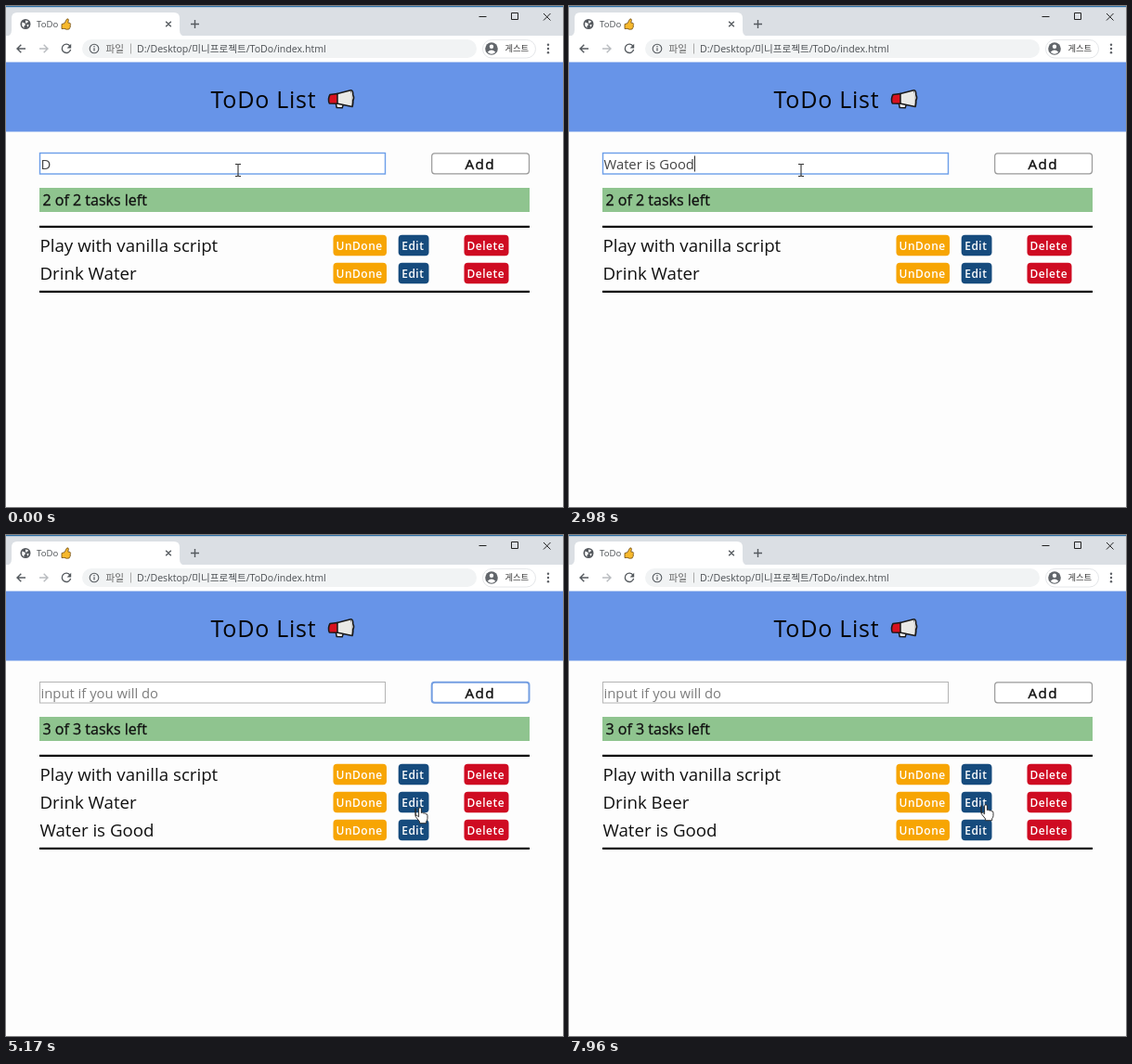
Write an HTML page that moves like this. It is 600 px wide and 540 px high and loops after 8000 ms.

```html
<!DOCTYPE html>
<html lang="ko">
<head>
<meta charset="utf-8">
<title>ToDo</title>
<style>
  html, body { margin: 0; width: 100%; height: 100%; overflow: hidden; background: #fdfdfd; }
  svg { display: block; width: 600px; height: 540px; }
  text { font-family: "Open Sans", "Noto Sans CJK KR", "Noto Sans CJK", sans-serif; white-space: pre; fill: #111; }
  .ui { font-size: 10.6px; fill: #4c5054; }
  .item { font-size: 18.7px; }
  .field { font-size: 14.8px; fill: #444; }
  .btn { font-size: 12px; font-weight: 600; letter-spacing: .5px; fill: #fff; }
  .line { fill: none; stroke: #555a5f; stroke-width: 1.4; }
</style>
</head>
<body>
<svg viewBox="0 0 600 540">
  <rect width="600" height="540" fill="#fdfdfd"/>

  <!-- window and tab strip -->
  <rect width="600" height="33" fill="#dbdfe4"/>
  <rect width="600" height="1.2" fill="#2f70a5"/>
  <path d="M0 33Q6 32 6 26V13Q6 7 12 7H181Q187 7 187 13V26Q187 32 193 33Z" fill="#fff"/>
  <circle cx="21" cy="19.5" r="5.5" fill="#55595e"/>
  <path d="M17.3 17.5l3 1 .6 2-1.5 1.2v2l-2.2-2.4zM21 15.5l3 .8-1 1.9-2 .2zM22.4 20l2.4.3-1.6 2.8z" fill="#fff"/>
  <text class="ui" x="33" y="23" style="font-size:9.6px">ToDo</text>
  <g stroke="#6d4a12" stroke-width=".8" stroke-linejoin="round">
    <path d="M60 19.5l3-.8 2.4-4.5q1.8-1.1 2 .9l-.6 3 2.2.3q1.2.8.2 1.9l.2 1.7-.6 1.5-.7 1.4q-2.8 1-5.3-.5l-2.8.2z" fill="#f7b92d"/>
  </g>
  <path class="line" d="M172.2 16.7l5.6 5.6m0-5.6l-5.6 5.6M199 19.5h9m-4.5-4.5v9"/>
  <path d="M509.5 11.5h8M544.5 7.5h7v7h-7zM579 8l7.5 7.5m0-7.5L579 15.5" fill="none" stroke="#222"/>

  <!-- toolbar -->
  <rect y="32" width="600" height="28.5" fill="#fff"/>
  <path class="line" d="M21 46H12m4.3-4.3L12 46l4.3 4.3"/>
  <path class="line" d="M36 46h9m-4.3-4.3L45 46l-4.3 4.3" style="stroke:#b9bcc0"/>
  <path class="line" d="M69 43.3a4.7 4.7 0 1 0 .6 3.6"/>
  <path d="M70.2 40.8v4.6h-4.6z" fill="#555a5f"/>
  <rect x="82" y="36" width="425" height="20" rx="10" fill="#f1f3f4"/>
  <circle class="line" cx="95" cy="46" r="4.8" style="stroke-width:1.1"/>
  <path class="line" d="M95 45.3v3.3M95 43v1.2" style="stroke-width:1.2"/>
  <text class="ui" x="107.5" y="49.7" style="fill:#666">파일</text>
  <path d="M134.5 40.5v11" stroke="#aaa"/>
  <text class="ui" x="141" y="49.7">D:/Desktop/미니프로젝트/ToDo/index.html</text>
  <rect x="513.5" y="36.5" width="57" height="19.5" rx="9.7" fill="#fff" stroke="#e4e6e9"/>
  <circle cx="523" cy="46" r="6.8" fill="#62666b"/>
  <circle cx="523" cy="43.7" r="2.2" fill="#fff"/>
  <path d="M518.7 49.7q4.3-4.4 8.6 0-4.3 4-8.6 0z" fill="#fff"/>
  <text class="ui" x="537.5" y="49" style="font-size:9.3px;fill:#333">게스트</text>
  <g fill="#5a5e63"><circle cx="584" cy="41.7" r="1.2"/><circle cx="584" cy="46" r="1.2"/><circle cx="584" cy="50.3" r="1.2"/></g>

  <!-- page header -->
  <rect y="60.5" width="600" height="75" fill="#6794e8"/>
  <text x="220.5" y="110" style="font-size:25px;letter-spacing:.75px;fill:#050505">ToDo List</text>
  <g stroke="#1a1a1a" stroke-width="1.5" stroke-linejoin="round">
    <path d="M355 103l1.2 6.5 6 .3 1-3.2" fill="#eee"/>
    <path d="M355 95L371.5 90.8Q375 98.5 372.8 108.5L355 104.8Z" fill="#e9e9e6"/>
    <path d="M357 94.5L349 95.5Q346.3 100 348.3 105L357 105.2Z" fill="#d8111f"/>
    <path d="M371.5 90.8q2.5 0 2.3 5 1.8 3-.2 6.2.4 6-.8 6.5" fill="#ccc"/>
  </g>

  <!-- entry row and summary -->
  <rect id="box" x="36.5" y="158.5" width="372" height="22.5" fill="#fff"/>
  <text id="entry" class="field" x="37.5" y="175.5"></text>
  <rect id="add" x="458.7" y="158.8" width="104.8" height="22" rx="3" fill="#fff"/>
  <text x="494.5" y="175.8" style="font-size:15.3px;letter-spacing:1.4px;stroke:#111;stroke-width:.4px">Add</text>
  <rect x="36" y="196" width="528" height="26" fill="#8fc48f"/>
  <text id="left" x="39.5" y="215" style="font-size:16px;stroke:#111;stroke-width:.3px"></text>

  <!-- list -->
  <rect x="36" y="236.8" width="528" height="2.2"/>
  <rect id="end" x="36" width="528" height="2.2"/>
  <g id="editor">
    <rect id="editBox" x="36.5" y="277.5" width="291" height="21.5" fill="#fff"/>
    <rect id="mark" x="88.5" y="278" width="52.5" height="20.8" fill="#3b92f4"/>
  </g>
  <g id="rows"></g>
  <rect id="caret" width="1" fill="#222"/>

  <g id="cursor">
    <path id="beam" d="M-3 -6.5h2.2L0 -5.7.8-6.5H3M0 -5.7V5.7M-3 6.5h2.2L0 5.7.8 6.5H3" fill="none" stroke="#333" stroke-width="1.1"/>
    <path id="arrow" d="M0 0V12.3L2.9 9.6 4.9 14.2 6.9 13.3 4.9 8.9H8.8Z" fill="#fff" stroke="#222" stroke-width=".9"/>
    <path id="hand" d="M-1.4 1Q-1.3-.3 0-.3T1.4 1V5.5Q2.7 4.6 3.8 6 5.2 5.2 6.2 6.7 8 6.2 8 8.4V11.5Q8 13.5 6.7 14.7V16.7H-.4V15L-4.7 9.6Q-5-7.7-5 8.5-3.6 7.4-1.4 9.8Z" fill="#fff" stroke="#222" stroke-width=".9" stroke-linejoin="round"/>
  </g>
</svg>
<script>
const LOOP = 8000, ADDED = 3720, EDITED = 5280, PICKED = 6370, SAVED = 7900;
const $ = id => document.getElementById(id);
const show = (el, on) => el.setAttribute("display", on ? "inline" : "none");
const set = (el, props) => { for (const k in props) el.setAttribute(k, props[k]); };

function make(tag, props, parent, text = "") {
  const el = document.createElementNS("http://www.w3.org/2000/svg", tag);
  set(el, props);
  el.textContent = text;
  parent.appendChild(el);
  return el;
}

function button(parent, x, y, width, fill, label, pad = 3.5) {
  const rect = make("rect", { x, y, width, height: 22.5, rx: 4, fill }, parent);
  const text = make("text", { class: "btn", x: x + pad, y: y + 16 }, parent, label);
  return { rect, text };
}

const rows = ["Play with vanilla script", "Drink Water", "Water is Good"].map((name, i) => {
  const g = make("g", {}, $("rows")), y = 246.8 + 30 * i;
  const text = make("text", { class: "item", x: 36.5, y: y + 18 }, g, name);
  button(g, 352.5, y, 57.5, "#f7a503", "UnDone", 3);
  const edit = button(g, 422.7, y, 32.8, "#164b7d", "Edit");
  button(g, 493.5, y, 48, "#cf0b22", "Delete", 3);
  return { g, text, edit };
});

// Key press times for each typed string
const entryKeys = [1060, 1390, 1480, 1580, 1780, 2040, 2110, 2260, 2410, 2670, 2770, 2880, 2980];
const editKeys = [6690, 6890, 6980, 7080];
const typed = (word, keys, t) => word.slice(0, keys.filter(k => k <= t).length);

// Pointer stops: time, x, y
const path = [
  [3180, 250, 177], [3600, 500, 170], [3780, 504, 171], [4020, 423, 170],
  [4140, 423, 170], [4560, 431, 255], [4920, 438, 291], [5160, 446, 294],
  [5280, 446, 294], [5760, 239, 299], [7380, 239, 299], [7860, 449, 291], [8000, 449, 291]
];

function pointer(time) {
  const t = Math.floor(time / 60) * 60;
  const i = path.findIndex(p => p[0] > t);
  if (i === 0) return path[0].slice(1);
  const [a, b] = [path[i - 1], path[i]];
  const u = (t - a[0]) / (b[0] - a[0]), s = u * u * (3 - 2 * u);
  return [a[1] + (b[1] - a[1]) * s, a[2] + (b[2] - a[2]) * s];
}

function pointerKind(x, y, count, editing) {
  const within = (l, r, top, bottom) => x >= l && x <= r && y >= top && y <= bottom;
  if (within(36, 409, 158, 181) || editing && within(36, 328, 277, 300)) return "beam";
  if (within(458, 564, 158, 181)) return "hand";
  for (let i = 0; i < count; i++) {
    const y0 = 247 + 30 * i;
    if ([[352, 410], [422, 456], [493, 542]].some(([l, r]) => within(l, r, y0, y0 + 22))) return "hand";
  }
  return "arrow";
}

function draw(t) {
  const added = t >= ADDED, count = added ? 3 : 2;
  const editing = t >= EDITED && t < SAVED;
  const picked = t >= PICKED && t < editKeys[0];

  const value = added ? "" : t < 130 ? "D" : typed("Water is Good", entryKeys, t);
  $("entry").textContent = value || "input if you will do";
  $("entry").style.fill = value ? "#444" : "#7d7d7d";
  set($("box"), { stroke: added ? "#b4b4b4" : "#6c9ee9", "stroke-width": added ? 1 : 1.4 });
  const addFocus = added && t < EDITED;
  set($("add"), { stroke: addFocus ? "#759fe2" : "#999", "stroke-width": addFocus ? 2 : 1.2 });

  $("left").textContent = `${count} of ${count} tasks left`;
  $("end").setAttribute("y", 246.8 + 30 * count);
  show(rows[2].g, added);

  const row = rows[1];
  if (picked) {
    row.text.textContent = "Drink ";
    make("tspan", { fill: "#fff", style: "fill:#fff" }, row.text, "Water");
  } else {
    row.text.textContent = "Drink " + (t < editKeys[0] ? "Water" : typed("Beer", editKeys, t));
  }
  row.edit.text.textContent = editing ? "Save" : "Edit";
  row.edit.rect.setAttribute("width", editing ? 36.8 : 32.8);
  show($("editor"), editing);
  show($("mark"), editing && picked);
  set($("editBox"), { stroke: t >= PICKED ? "#3572bd" : "#b4b4b4", "stroke-width": t >= PICKED ? 1.3 : 1 });

  const entryCaret = t >= 130 && !added, editCaret = editing && t >= editKeys[0];
  show($("caret"), entryCaret || editCaret);
  if (entryCaret) {
    set($("caret"), { x: 37.5 + (value ? $("entry").getComputedTextLength() : 0), y: 161.5, height: 17 });
  } else if (editCaret) {
    set($("caret"), { x: 36.5 + row.text.getComputedTextLength(), y: 278.5, height: 19.5 });
  }

  const [x, y] = pointer(t), kind = pointerKind(x, y, count, editing);
  $("cursor").setAttribute("transform", `translate(${x.toFixed(1)} ${y.toFixed(1)})`);
  for (const id of ["beam", "arrow", "hand"]) show($(id), id === kind);
}

const start = performance.now();
function tick() {
  draw((performance.now() - start) % LOOP);
  requestAnimationFrame(tick);
}
tick();
</script>
</body>
</html>
```
